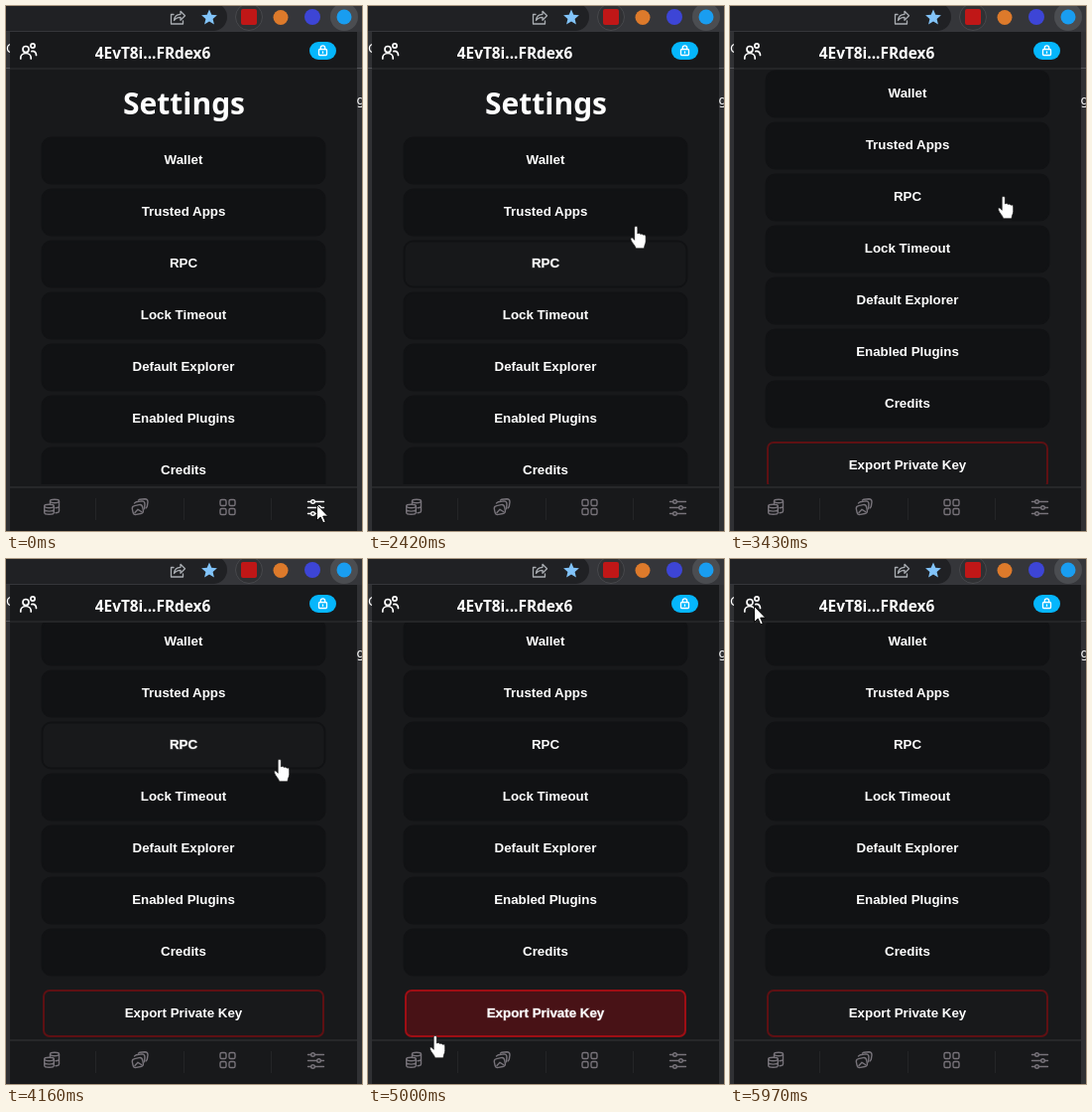
These frames come from a looping animation (359x528 px, 6220 ms). An HTML page:

```html
<!DOCTYPE html>
<html lang="en">
<head>
<meta charset="utf-8">
<title>Wallet settings</title>
<style>
  html, body { margin: 0; width: 100%; height: 100%; overflow: hidden; background: #18191b; }
  svg { display: block; width: 359px; height: 528px; }
  text { fill: #fff; font-weight: 700; }
  .btn text { font-family: "Liberation Sans", Arial, sans-serif; font-size: 13.333px; text-anchor: middle; }
  .head { font-family: "Noto Sans", "Open Sans", sans-serif; text-anchor: middle; }
  .edge { font: 400 13px "Noto Sans", sans-serif; }
  .line { fill: none; stroke-linecap: round; stroke-linejoin: round; }
  .nav { stroke: #77737a; stroke-width: 1.4; }
</style>
</head>
<body>
<svg viewBox="0 0 359 528">
  <defs>
    <clipPath id="view"><rect x="4" y="64" width="350" height="417"/></clipPath>
  </defs>

  <!-- browser bar -->
  <rect width="359" height="528" fill="#303134"/>
  <rect width="359" height="26" fill="#35363a"/>
  <rect x="-20" y="-3" width="243" height="28" rx="14" fill="#202124"/>
  <g class="line" stroke="#a9adb2" stroke-width="1.3">
    <path d="M169 8.5h-2.500v9.500h12v-3"/>
    <path d="M169.500 14.500c.3-4 2.500-6 6.500-6.200v-3l4.500 4.500-4.500 4.500v-3c-3 0-5 .8-6.500 3.200z"/>
  </g>
  <path d="M205 3.500l2.300 5.200 5.600.5-4.300 3.700 1.300 5.500-4.900-2.900-4.900 2.900 1.300-5.500-4.300-3.700 5.600-.5z" fill="#82c4fa"/>
  <circle cx="245" cy="11" r="13.500" fill="#303134" stroke="#47484c"/>
  <circle cx="341" cy="11" r="14" fill="#4b4d51"/>
  <rect x="237" y="3" width="16" height="16" rx="2" fill="#c01717"/>
  <circle cx="277" cy="11.500" r="7.500" fill="#dd7a2b"/>
  <circle cx="309" cy="11" r="8" fill="#3d45d6"/>
  <circle cx="341" cy="11" r="7.500" fill="#199df0"/>

  <!-- page behind the popup -->
  <path d="M0 62.500h359" stroke="#55565a"/>
  <text class="edge" x="0" y="47">C</text>
  <text class="edge" x="353.500" y="99">g</text>

  <!-- popup -->
  <rect x="4" y="26" width="350" height="502" fill="#18191b"/>
  <rect x="4" y="62" width="350" height="2" fill="#242527"/>
  <g class="line" stroke="#fff" stroke-width="1.700">
    <circle cx="20" cy="43.500" r="3"/>
    <path d="M14.800 53v-1a5.200 4.500 0 0 1 10.400 0v1"/>
    <circle cx="27" cy="40" r="2.100"/>
    <path d="M25.800 45.600c2.900-.6 4.700 1 4.700 3.900"/>
  </g>
  <text class="head" x="148" y="53" font-size="15.400">4EvT8i...FRdex6</text>
  <rect x="306" y="36" width="27" height="18" rx="9" fill="#05b6fc"/>
  <g class="line" stroke="#fff" stroke-width="1.300">
    <rect x="315.500" y="43.500" width="8" height="6" rx="1"/>
    <path d="M317.300 43.500v-1.500a2.200 2.200 0 0 1 4.400 0v1.500M319.500 46v1.200"/>
  </g>

  <g clip-path="url(#view)">
    <g id="list"><text class="head" x="179.500" y="109" font-size="30">Settings</text></g>
  </g>

  <!-- tab bar -->
  <rect x="4" y="483" width="350" height="2" fill="#27282a"/>
  <path d="M90.500 495v22M179.500 495v22M267.500 495v22" stroke="#242527"/>
  <g class="line nav" id="coins">
    <ellipse cx="49" cy="498" rx="4.500" ry="1.700"/>
    <path d="M44.500 498v2.500M53.500 498v10c0 1-1.500 1.700-3.500 1.800M53.500 503c0 1-1.500 1.700-3.500 1.800"/>
    <ellipse cx="43.500" cy="503" rx="4.800" ry="1.700"/>
    <path d="M38.700 503v6.500c0 2.400 9.600 2.400 9.600 0V503M38.700 506.300c0 2.400 9.600 2.400 9.600 0"/>
  </g>
  <g class="line nav">
    <rect x="127.500" y="502" width="10.500" height="9" rx="3" transform="rotate(-12 133 506)"/>
    <path d="M129.500 500l2-1.300 5.500-.8c2 0 3 1 3 3l-.5 5M133.500 497l1.500-.8 5-.4c2 0 3 1 3 3l-.7 4.500-1 1.500"/>
    <path d="M130 509.500l3-3.200 3.500 2.200"/>
  </g>
  <g class="line nav" id="grid"></g>
  <g class="line nav" id="sliders">
    <path d="M304.500 498.500h3M311.500 498.500h9M304.500 504.500h9M317.500 504.500h3M304.500 510.500h3M311.500 510.500h9"/>
    <circle cx="309.500" cy="498.500" r="1.800"/>
    <circle cx="315.500" cy="504.500" r="1.800"/>
    <circle cx="309.500" cy="510.500" r="1.800"/>
  </g>

  <!-- pointers, tip at 0,0 -->
  <path id="arrow" d="M.5.5v16l3.700-3.500 2.600 5.800 2.400-1.100-2.500-5.600h5z" fill="#fff" stroke="#000" stroke-width=".9"/>
  <path id="hand" d="M-.8.8c0-1.800 3.200-1.800 3.200 0v6.200c.6-.8 2.600-.7 2.900.5.800-.7 2.500-.4 2.800.8 1-.6 2.600 0 2.600 1.600v4.600c0 2.600-1.500 3.700-1.700 7.300h-8.400c-.5-3-3.800-5.300-5.100-8.900-.6-1.800 1.500-2.500 2.500-1.200l1.200 1.600z" fill="#fff" stroke="#111" stroke-width=".7"/>
</svg>
<script>
const LOOP = 6220, FPS = 12, END_SCROLL = 72;
const FADE = 100, LAG = 40;
const $ = id => document.getElementById(id);
const list = $('list');

const smooth = p => p * p * (3 - 2 * p);
const brake = p => 1 - (1 - p) ** 7;
const progress = (t, from, to) => Math.min(1, Math.max(0, (t - from) / (to - from)));

// Pointer moves: when, where to, how
const MOVES = [
  { from: 1870, to: 2560, x: 264, y: 187, ease: smooth },
  { from: 2560, to: 2660, x: 275, y: 192, ease: smooth },
  { from: 3660, to: 4160, x: 275, y: 202, ease: smooth },
  { from: 4590, to: 4960, x: 67, y: 480, ease: smooth },
  { from: 5000, to: 5080, x: 46, y: 487, ease: smooth },
  { from: 5080, to: 5900, x: 24, y: 47, ease: brake },
];

function pointer(t) {
  let x = 313, y = 501;
  for (const m of MOVES) {
    const p = m.ease(progress(t, m.from, m.to));
    x += (m.x - x) * p;
    y += (m.y - y) * p;
  }
  return { x, y };
}

const scroll = t => END_SCROLL * smooth(progress(t, 3030, 3490));

function make(tag, attrs, parent) {
  const el = document.createElementNS('http://www.w3.org/2000/svg', tag);
  for (const name in attrs) el.setAttribute(name, attrs[name]);
  return parent.appendChild(el);
}

for (const x of [216, 225])
  for (const y of [496.5, 505.5]) make('rect', { x, y, width: 6, height: 6, rx: 1.6 }, $('grid'));

function button(label, y, danger) {
  const g = make('g', { class: 'btn' }, list);
  const box = make('rect', danger
    ? { x: 38, y: y + 1, width: 282, height: 46, rx: 6, 'stroke-width': 2 }
    : { x: 36.5, y: y + .5, width: 285, height: 46, rx: 9, 'stroke-width': 2 }, g);
  const text = make('text', { x: 179, y: y + (danger ? 28 : 27) }, g);
  text.textContent = label;
  return { box, text, y, danger };
}

const buttons = ['Wallet', 'Trusted Apps', 'RPC', 'Lock Timeout', 'Default Explorer', 'Enabled Plugins', 'Credits']
  .map((label, i) => button(label, 132 + 52 * i, false));
buttons.push(button('Export Private Key', 505, true));

// Index of the button under the pointer, or -1
function hit(t) {
  const { x, y } = pointer(t);
  if (y > 482 || y < 64 || x < 36 || x > 322) return -1;
  const top = y + scroll(t);
  return buttons.findIndex(b => top >= b.y && top <= b.y + 48);
}

// Hover fades in and out, and is off while the list moves.
function glow(i, t) {
  const n = 10;
  let sum = 0;
  for (let k = 0; k < n; k++) {
    const then = t - LAG - FADE * k / n;
    sum += scroll(then) % END_SCROLL === 0 && hit(then) === i;
  }
  return sum / n;
}

const mix = (a, b, p) => `rgb(${a.map((v, i) => Math.round(v + (b[i] - v) * p))})`;
const DARK = [17, 18, 20], LIT = [24, 25, 27];
const WINE = [72, 18, 22], RED = [94, 16, 19], BRIGHT_RED = [158, 14, 20];

function draw(t) {
  const { x, y } = pointer(t);
  list.setAttribute('transform', `translate(0 ${-scroll(t)})`);
  buttons.forEach((b, i) => {
    const p = glow(i, t);
    b.box.setAttribute('fill', b.danger ? mix(LIT, WINE, p) : mix(DARK, LIT, p));
    b.box.setAttribute('stroke', b.danger ? mix(RED, BRIGHT_RED, p) : mix(DARK, DARK, 0));
    b.text.setAttribute('stroke', `rgba(255,255,255,${.3 * p})`);
  });
  const overTabs = y > 485;
  $('coins').style.stroke = overTabs && x < 90 ? '#fff' : '';
  $('sliders').style.stroke = overTabs && x > 267 ? '#fff' : '';
  const hand = hit(t) >= 0;
  $('hand').style.display = hand ? '' : 'none';
  $('arrow').style.display = hand ? 'none' : '';
  $(hand ? 'hand' : 'arrow').setAttribute('transform', `translate(${x} ${y})`);
}

const start = performance.now();
let last = -1;
function frame() {
  const t = (performance.now() - start) % LOOP;
  const tick = Math.floor((t + 14) * FPS / 1000);
  if (tick !== last) {
    last = tick;
    draw(tick * 1000 / FPS);
  }
  requestAnimationFrame(frame);
}
draw(0);
requestAnimationFrame(frame);
</script>
</body>
</html>
```
